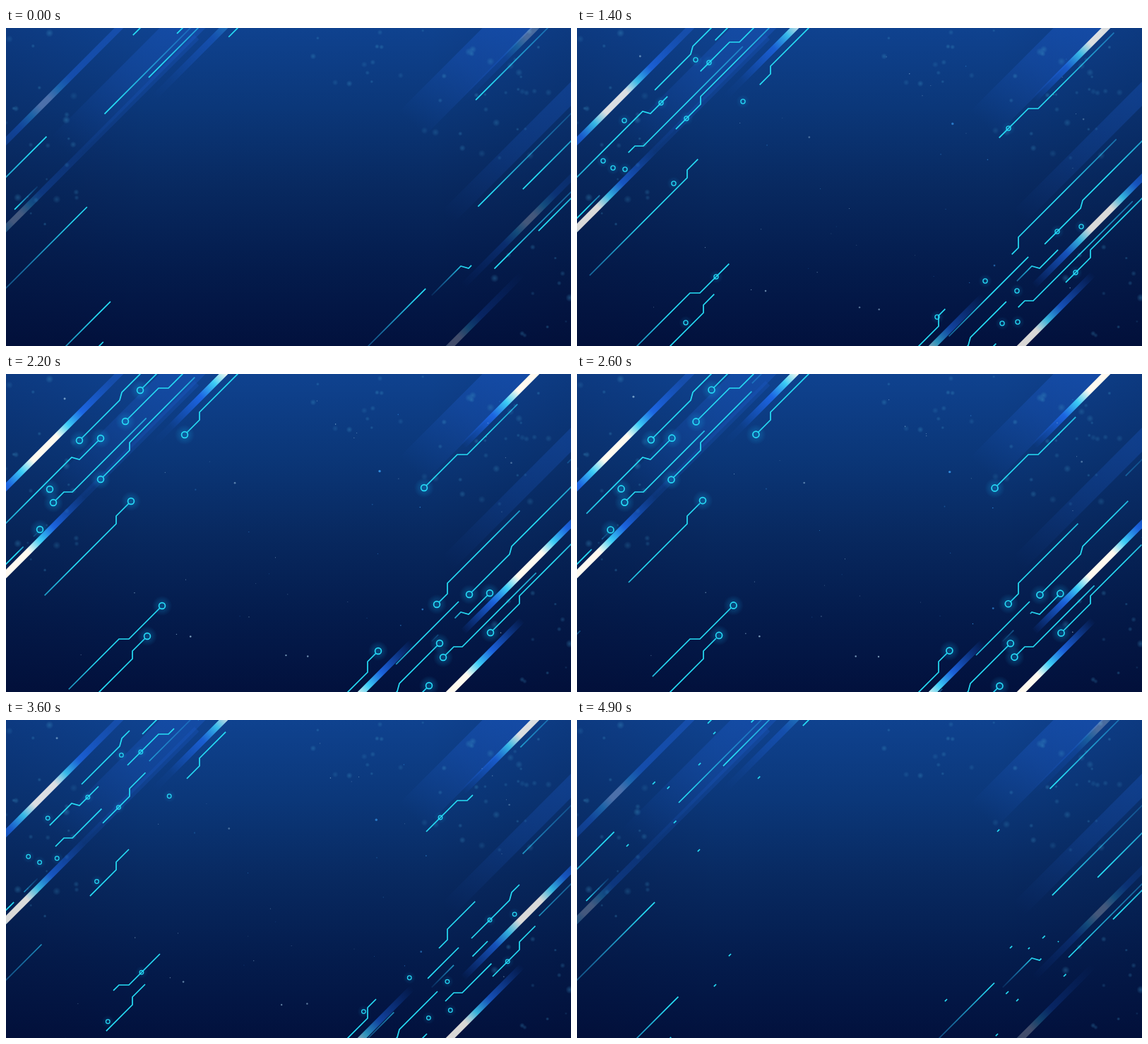
Write an HTML page with a canvas that moves like this. It is 800x450 px and loops after 5000 ms.

```html
<!DOCTYPE html>
<html lang="en">
<head>
<meta charset="utf-8">
<title>Circuit lines</title>
<style>
html, body { margin: 0; width: 100%; height: 100%; overflow: hidden; background: #08285f; }
canvas { display: block; }
</style>
</head>
<body>
<canvas id="stage" width="800" height="450"></canvas>
<script>
const ctx = document.getElementById('stage').getContext('2d');
const LOOP = 5, TRAVEL = 4.85, HEAD = 1.61, TAIL = 5.12, PEAK = 2.46;
const clamp = v => Math.max(0, Math.min(1, v));

let seed = 11;
function rnd(lo = 0, hi = 1) {
  seed = (seed * 16807) % 2147483647;
  return lo + (hi - lo) * seed / 2147483647;
}
const many = (n, make) => Array.from({ length: n }, make);

const rings = [{ x: 48, y: 220, slide: 20 }, { x: 62, y: 163, slide: -25 }];
const traces = [];

// A trace ends at (x, y); seen from there it runs diagonally by `last`, bends by
// (dx, dy), then goes on diagonally. dir 1 comes from the upper right, -1 from
// the lower left. The ring waiting at its end swings diagonally by `slide`.
function place(length, last, dx, dy, spots) {
  for (const [x, y, dir, slide] of spots) {
    const bx = last + dx, by = -last + dy;
    const far = (length - last * Math.SQRT2 - Math.hypot(dx, dy)) * Math.SQRT1_2;
    const pts = [[bx + far, by - far], [bx, by], [last, -last], [0, 0]]
      .map(([px, py]) => [x + dir * px, y + dir * py]);
    const paint = ctx.createLinearGradient(...pts[0], ...pts[3]);
    paint.addColorStop(0, 'rgba(40,165,235,0.12)');
    paint.addColorStop(0.3, 'rgba(40,180,235,0.55)');
    paint.addColorStop(0.62, 'rgb(38,222,246)');
    traces.push({ pts, length, paint });
    if (slide) rings.push({ x: x - 3 * dir, y: y + 3 * dir, slide });
  }
}
place(310, 12, 12, 0, [[70, 179, 1, -16], [622, 398, 1, -17]]);
place(310, 44, 14, 0, [[172, 64, 1, 18], [595, 158, 1, 19], [218, 331, -1, -24]]);
place(315, 18, 0, -11, [[256, 83, 1, -18], [174, 183, -1, -40], [197, 374, -1, -46]]);
place(342, 38, 0, -11, [[137, 146, 1, 21], [689, 363, 1, 20]]);
place(366, 54, 3, -11, [[107, 91, 1, -37], [659, 309, 1, 24], [611, 384, -1, 9]]);
place(310, 12, 0, -15, [[613, 323, 1, -32], [524, 395, -1, -17]]);
place(332, 27, 11, 3, [[131, 94, -1, -15]]);
place(108, 27, 11, 3, [[682, 313, -1, 29]]);
place(310, 0, 0, 0, [[193, 20, 1, -22], [596, 444, -1, 25]]);
place(220, 0, 0, 0, [[641, 322, -1, 0]]);
place(66, 0, 0, 0, [[-2, 271, 1, 0]]);

// Soft dots gather at the left edge, the upper right and the lower right.
const scatter = (n, x0, y0, x1, y1) => many(n, () => ({
  x: rnd(x0, x1), y: rnd(y0, y1), r: rnd(2, 6), a: rnd(0.2, 0.42)
}));
const haze = [
  ...scatter(24, 0, 0, 100, 300),
  ...scatter(32, 590, 0, 770, 185),
  ...scatter(12, 690, 310, 800, 445),
  ...scatter(12, 420, 5, 580, 80)
];
const dust = many(40, () => ({
  x: rnd(90, 730), y: rnd(20, 420), dx: rnd(-8, 8), dy: rnd(-8, 8),
  r: 0.5 + 1.3 * rnd() ** 4, a: rnd(0.25, 0.8), rgb: rnd() < 0.3 ? '60,160,245' : '175,215,240'
}));

function dot(x, y, r) {
  ctx.beginPath();
  ctx.arc(x, y, r, 0, 7);
}

function blob(x, y, r, rgb, a) {
  const g = ctx.createRadialGradient(x, y, 0, x, y, r);
  g.addColorStop(0, `rgba(${rgb},${a})`);
  g.addColorStop(0.45, `rgba(${rgb},${a * 0.6})`);
  g.addColorStop(1, `rgba(${rgb},0)`);
  ctx.fillStyle = g;
  ctx.fillRect(x - r, y - r, 2 * r, 2 * r);
}

// Diagonal stroke from (x, y), d pixels down and to the left.
function slash(x, y, d, width, style) {
  ctx.strokeStyle = style;
  ctx.lineWidth = width;
  ctx.beginPath();
  ctx.moveTo(x, y);
  ctx.lineTo(x - d, y + d);
  ctx.stroke();
}

function band(x, y, d, width, a) {
  const g = ctx.createLinearGradient(x, y, x - d, y + d);
  [1, 0.65, 0].forEach((k, i) => g.addColorStop(i / 2, `rgba(27,88,195,${a * k})`));
  slash(x, y, d, width, g);
}

function backdrop() {
  const sky = ctx.createLinearGradient(0, 0, 0, 450);
  ['#0f428f', '#0b3779', '#082960', '#041c4d', '#02113d']
    .forEach((c, i) => sky.addColorStop(i / 4, c));
  const sides = ctx.createLinearGradient(0, 0, 800, 0);
  [0.14, 0, 0, 0, 0.14].forEach((a, i) => sides.addColorStop(i / 4, `rgba(0,8,40,${a})`));
  for (const style of [sky, sides]) {
    ctx.fillStyle = style;
    ctx.fillRect(0, 0, 800, 450);
  }
  band(275, -25, 195, 46, 0.45);
  band(735, -25, 160, 50, 0.55);
  band(815, 78, 190, 24, 0.34);
  band(270, 13, 290, 9, 0.3);
  band(170, -10, 250, 9, 0.6);
  band(325, -17, 115, 9, 0.4);
  haze.forEach(h => blob(h.x, h.y, h.r, '58,145,195', h.a));
}

// Light streak centred on (x, y): white core, cyan, then blue fading out.
function streak(x, y, power) {
  const R = 95, g = ctx.createLinearGradient(x + R, y - R, x - R, y + R);
  const stops = [
    [R, '25,95,225', 0],
    [30 + 22 * power, '30,105,235', 0.15 + 0.75 * power ** 2],
    [14 + 19 * power, '60,205,245', power],
    [2 + 15 * power, '255,250,240', power]
  ];
  for (const [d, rgb, a] of stops)
    for (const s of [-1, 1]) g.addColorStop(0.5 + s * d / (2 * R), `rgba(${rgb},${a})`);
  slash(x + R, y - R, 2 * R, 9, g);
}

function drawTrace({ pts, length, paint }, t) {
  ctx.strokeStyle = paint;
  ctx.lineWidth = 1.7;
  for (const u of [t, t + LOOP]) {
    const head = clamp((u - HEAD) / TRAVEL) * length;
    const tail = clamp((u - TAIL) / TRAVEL) * length;
    if (head - tail < 0.2) continue;
    ctx.setLineDash([head - tail, 9999]);
    ctx.lineDashOffset = -tail;
    ctx.beginPath();
    pts.forEach(p => ctx.lineTo(...p));
    ctx.stroke();
  }
  ctx.setLineDash([]);
}

function drawRing({ x, y, slide }, t) {
  const away = Math.abs(t - PEAK), r = 4.5 - 1.3 * away * away;
  if (r < 0.3) return;
  const d = slide * (away ** 2.5 - 0.034) / 1.12;
  blob(x + d, y - d, r * 3.2, '20,170,235', 0.32 * clamp((r - 1) / 3.4));
  ctx.strokeStyle = 'rgb(38,218,246)';
  ctx.lineWidth = 0.5 + r * 0.27;
  dot(x + d, y - d, r);
  ctx.stroke();
}

function draw(t) {
  const glow = clamp(1.7 * Math.sin(Math.PI * t / LOOP) - 0.51);
  const power = 0.25 + 0.75 * glow;
  backdrop();
  for (const [x, y] of [[55, 105], [15, 268], [328, -20], [742, 7], [742, 270], [636, 443]])
    streak(x, y, power);
  ctx.globalAlpha = glow;
  streak(480, 474, power);
  ctx.globalAlpha = 1;
  for (const p of dust) {
    ctx.fillStyle = `rgba(${p.rgb},${p.a * glow})`;
    dot(p.x + p.dx * t, p.y + p.dy * t, p.r);
    ctx.fill();
  }
  traces.forEach(l => drawTrace(l, t));
  rings.forEach(c => drawRing(c, t));
}

const begin = performance.now();
function frame() {
  draw((performance.now() - begin) / 1000 % LOOP);
  requestAnimationFrame(frame);
}
frame();
</script>
</body>
</html>
```
